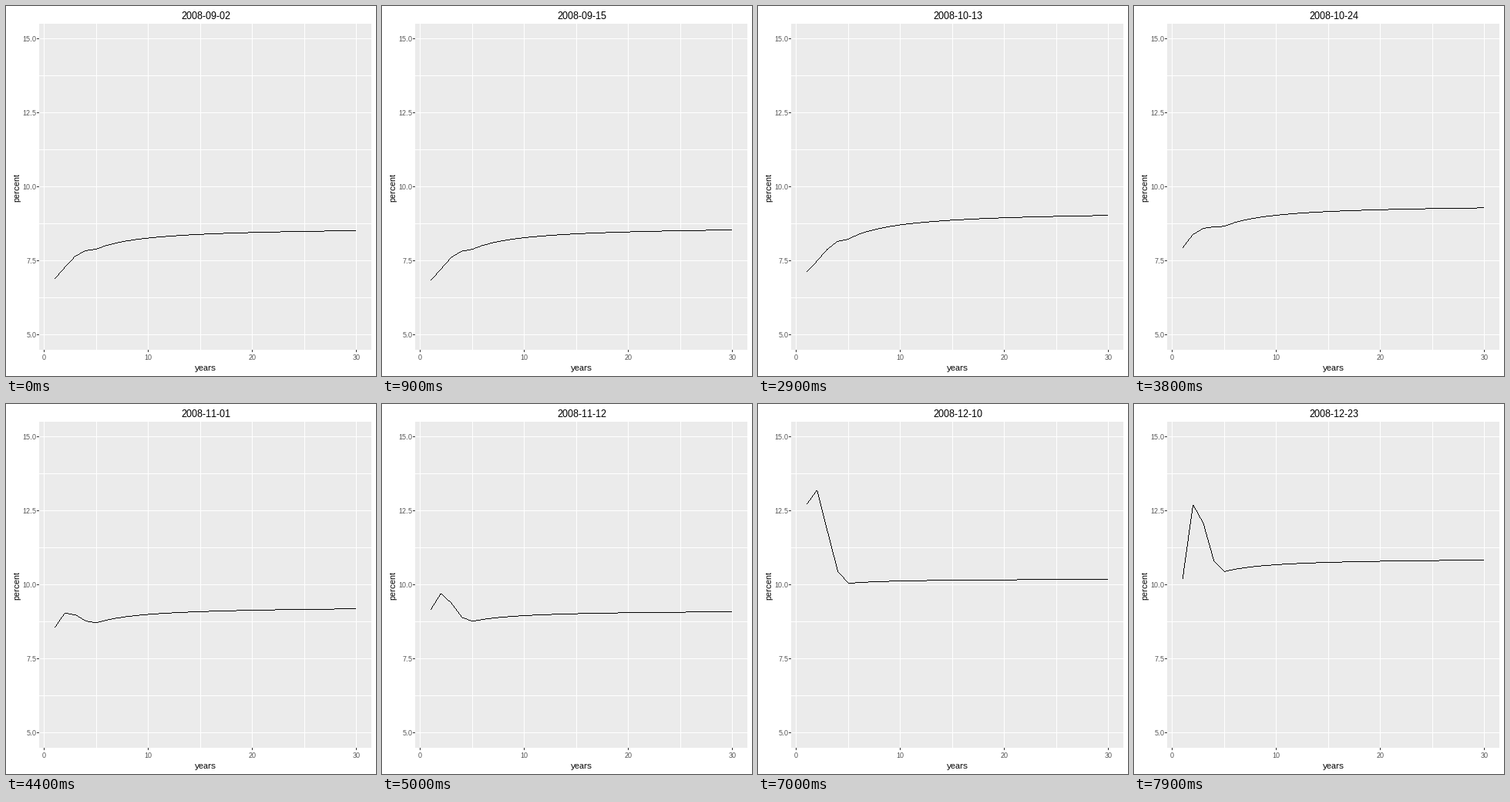
Write a matplotlib script that moves like this. It is 480x480 px and loops after 8 s.

```python
import matplotlib.pyplot as plt
import numpy as np
from matplotlib.animation import FuncAnimation
from matplotlib.patches import Rectangle

plt.rcParams.update({
    "font.family": "Liberation Sans",
    "text.hinting": "default",
    "text.hinting_factor": 1,
})

SIZE, DPI = 480, 72
FRAMES, INTERVAL = 80, 100
LEFT, RIGHT, TOP, BOTTOM = 43, 474, 23, 446
YEARS = np.arange(1, 31)

# start step: easing power, level and slope of the long end,
# then how far years 1, 2 and 3 stand off from year 5
POSES = {
    0: (3, 8.655, 3.75, -1.02, -0.62, -0.24),
    20: (1, 8.987, 5.90, -1.51, -1.22, -0.62),
    38: (1, 9.425, 3.75, -0.74, -0.28, -0.07),
    50: (3, 9.165, 1.95, 0.38, 0.94, 0.60),
    70: (1, 10.22, 0.80, 2.65, 3.14, 1.75),
    79: (1, 10.925, 2.35, -0.26, 2.26, 1.61),
}


def px(year):
    return LEFT + (year + 0.45) * (RIGHT - LEFT) / 31.9


def py(percent):
    return 426.5 - (percent - 5) * 38.4


def trading_days():
    days = np.arange("2008-09-02", "2008-12-24", dtype="datetime64[D]")
    is_open = np.is_busday(days, holidays=["2008-11-03", "2008-11-04"])
    is_open |= days == np.datetime64("2008-11-01")
    return days[is_open]


def pose(i):
    starts = list(POSES)
    k = min(np.searchsorted(starts, i, side="right"), len(starts) - 1)
    a, b = starts[k - 1], starts[k]
    power, *p = POSES[a]
    p, q = np.array(p), np.array(POSES[b][1:])
    return p + (q - p) * ((i - a) / (b - a)) ** power


def curve(i):
    level, slope, *short = pose(i)
    yields = level - slope / np.maximum(YEARS, 5)
    yields[:4] += [*short, 0.22 * short[-1]]
    return yields


fig = plt.figure(figsize=(SIZE / DPI, SIZE / DPI), dpi=DPI, facecolor="white")
ax = fig.add_axes([0, 0, 1, 1])
ax.set(xlim=(0, SIZE), ylim=(SIZE, 0))
ax.axis("off")


def box(x, y, w, h, color):
    ax.add_patch(Rectangle((x, y), w, h, fc=color, lw=0, antialiased=False))


def label(x, y, text, size, color="black", ha="center", **kw):
    return ax.text(x, y, text, fontsize=size, color=color, ha=ha,
                   va="baseline", **kw)


box(LEFT, TOP, RIGHT - LEFT, BOTTOM - TOP, "#EBEBEB")
for year in range(0, 31, 5):
    x = int(px(year) + 0.5)
    box(x, TOP, 1, BOTTOM - TOP, "white")
    if year % 10 == 0:
        box(x, BOTTOM, 1, 3, "#333333")
        label(x + 0.5, 459, str(year), 9, "#4D4D4D")
for k in range(9):
    percent = 5 + 1.25 * k
    y = int(py(percent))
    box(LEFT, y, RIGHT - LEFT, 1, "white")
    if k % 2 == 0:
        box(LEFT - 3, y, 3, 1, "#333333")
        label(39.5, y + 4, f"{percent:.1f}", 9, "#4D4D4D", "right")

label(259, 473, "years", 11)
label(17, 235, "percent", 11, rotation=90, rotation_mode="anchor")
title = label(259, 17, "", 13)

# The curve is a crisp one-pixel line: one run of whole pixels per column
EDGES = np.arange(63, 455)
FLAT = np.zeros(len(EDGES) - 1)
line = ax.stairs(FLAT, EDGES, baseline=FLAT, fill=True, color="black",
                 lw=0, antialiased=False)
ax.set(xlim=(0, SIZE), ylim=(SIZE, 0))
DAYS = trading_days()


def update(i):
    y = np.round(np.interp(EDGES - 0.5, px(YEARS), py(curve(i))))
    top = np.minimum(y[:-1], y[1:])
    bottom = np.maximum(np.maximum(y[:-1], y[1:]), top + 1)
    line.set_data(values=top, edges=EDGES, baseline=bottom)
    title.set_text(str(DAYS[i]))
    return title, line


anim = FuncAnimation(fig, update, frames=FRAMES, interval=INTERVAL,
                     repeat=True, repeat_delay=0)
plt.show()
```
